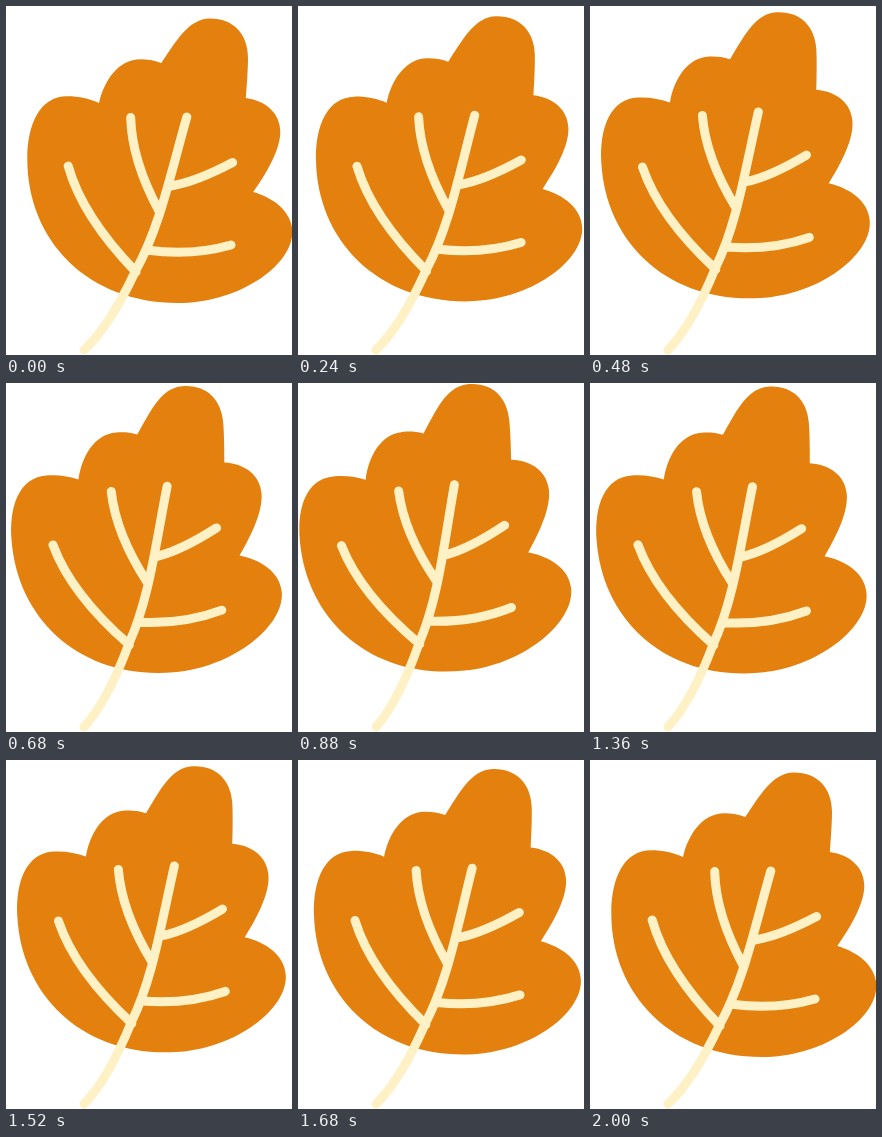
Recreate the animation shown at these times as an HTML page with a canvas. Size 286 by 349 pixels, loop 2.08 s.

```html
<!DOCTYPE html>
<html lang="en">
<head>
<meta charset="utf-8">
<title>Swaying leaf</title>
<style>
  html, body { margin: 0; width: 286px; height: 349px; overflow: hidden; background: #fff; }
  canvas { display: block; }
</style>
</head>
<body>
<canvas id="stage" width="286" height="349"></canvas>
<script>
const ctx = document.getElementById('stage').getContext('2d');
const LOOP = 2080, STEP = 40, LAST = 50;
const PIVOT = { x: 78, y: 344 };
const SWAY = 6.1 * Math.PI / 180;

const blade = new Path2D(
  'M93 97 C84 93 73 90.3 61 90.3 C34 90.3 21.3 118 21.3 153' +
  'C21.3 235 82 297 172 297 C232 297 286.3 260 286.3 226' +
  'C286.3 206 268 192 247.3 186 C257 172 274.3 146 274.3 126' +
  'C274.3 108 261 95 239.8 92 C241 78 242 62 242 52' +
  'C242 28 227.5 12.5 204 12.5 C182 12.5 169.3 37 155.3 57' +
  'C148 54 141 53.2 134.5 53.2 C112 53.2 98 75 93 97Z'
);

const veins = new Path2D(
  'M180.8 111 C164 170 153.5 222 129.5 265 C114.5 297 98.5 325 78 344' +
  'M62.2 160 C73 199 100 235 130 266' +
  'M124.7 111.6 C125.5 144 138.5 178 153 205' +
  'M226.6 156.6 C205 168 184 177 165 180' +
  'M225 239 C197 247 170 248 142 244.3'
);

// Cosine sway, one step before its resting end at time zero
const swing = t => (1 - Math.cos((t + STEP) / LOOP * 2 * Math.PI)) / 2;

function draw(t) {
  const time = Math.min(Math.floor(t / STEP), LAST) * STEP;
  ctx.setTransform(1, 0, 0, 1, 0, 0);
  ctx.fillStyle = '#fff';
  ctx.fillRect(0, 0, 286, 349);
  ctx.translate(PIVOT.x, PIVOT.y);
  ctx.rotate(-SWAY * (swing(time) - swing(0)));
  ctx.translate(-PIVOT.x, -PIVOT.y);
  ctx.fillStyle = '#e4800d';
  ctx.fill(blade);
  ctx.strokeStyle = '#fff1c6';
  ctx.lineWidth = 9;
  ctx.lineCap = ctx.lineJoin = 'round';
  ctx.stroke(veins);
}

const start = performance.now();
function tick() {
  draw((performance.now() - start) % LOOP);
  requestAnimationFrame(tick);
}
tick();
</script>
</body>
</html>
```
